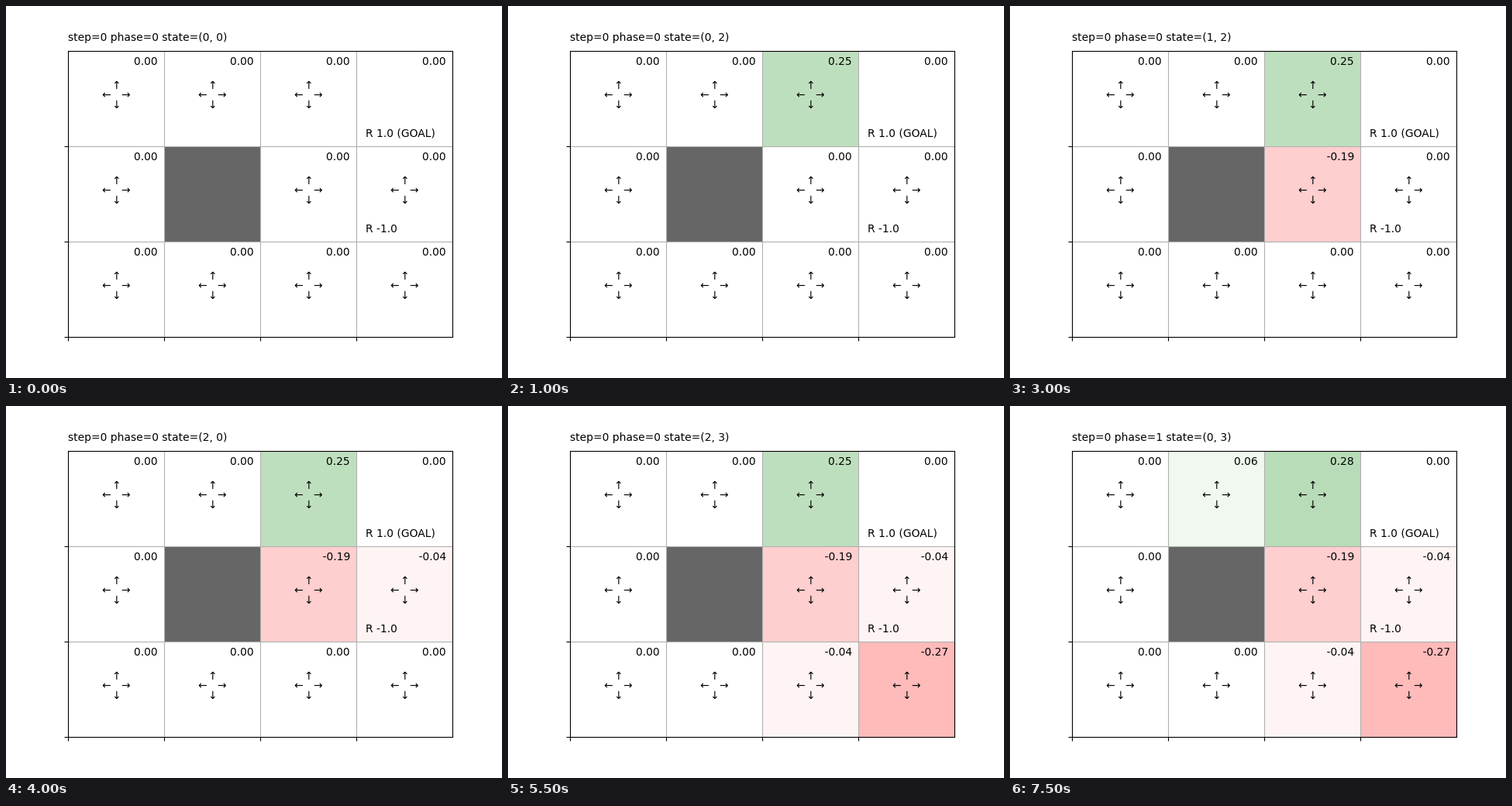
Animation of 640x480 px, one loop 8 s. Source, as a matplotlib script:

```python
import numpy as np
import matplotlib.pyplot as plt
from matplotlib.animation import FuncAnimation
from matplotlib.colors import LinearSegmentedColormap

ROWS, COLS = 3, 4
GOAL, WALL = (0, 3), (1, 1)
REWARDS = {GOAL: 1.0, (1, 3): -1.0}
MOVES = [(-1, 0), (1, 0), (0, -1), (0, 1)]
GAMMA = 0.9
FRAMES = 16


def step(state, move):
    y, x = state[0] + move[0], state[1] + move[1]
    if not (0 <= y < ROWS and 0 <= x < COLS) or (y, x) == WALL:
        return state
    return y, x


def evaluate(values, state):
    """In-place Bellman update of one state under the random policy."""
    if state == GOAL:
        return
    total = 0.0
    for move in MOVES:
        nxt = step(state, move)
        total += 0.25 * (REWARDS.get(nxt, 0.0) + GAMMA * values[nxt])
    values[state] = total


def sweep():
    values = np.zeros((ROWS, COLS))
    history = []
    for i in range(FRAMES):
        phase, cell = divmod(i, ROWS * COLS)
        state = divmod(cell, COLS)
        evaluate(values, state)
        history.append((phase, state, values.copy()))
    return history


history = sweep()

plt.rcParams["font.family"] = "DejaVu Sans"
fig = plt.figure(figsize=(6.4, 4.8), dpi=100)
ax = fig.add_subplot(111)
cmap = LinearSegmentedColormap.from_list("values", ["red", "white", "green"])
mesh = ax.pcolormesh(np.zeros((ROWS, COLS)), cmap=cmap, vmin=-1, vmax=1)
ax.tick_params(labelbottom=False, labelleft=False)
ax.set_xticks(range(COLS))
ax.set_yticks(range(ROWS))
ax.set_xlim(0, COLS)
ax.set_ylim(0, ROWS)
ax.grid(True)

title = ax.text(0, ROWS + 0.1, "")
labels = {}
for y, x in np.ndindex(ROWS, COLS):
    top = ROWS - y
    if (y, x) == WALL:
        ax.add_patch(plt.Rectangle((x, top - 1), 1, 1, fc=(0.4, 0.4, 0.4)))
        continue
    labels[y, x] = ax.text(x + 0.4, top - 0.15, "")
    if (y, x) in REWARDS:
        suffix = " (GOAL)" if (y, x) == GOAL else ""
        ax.text(x + 0.1, top - 0.9, f"R {REWARDS[y, x]}{suffix}")
    if (y, x) != GOAL:
        for (dy, dx), arrow in zip(MOVES, "↑↓←→"):
            ax.text(x + 0.45 + 0.1 * dx, top - 0.5 - 0.1 * dy, arrow)


def update(i):
    phase, (y, x), values = history[i]
    title.set_text(f"step=0 phase={phase} state=({y}, {x})")
    mesh.set_array(np.flipud(values))
    for state, label in labels.items():
        label.set_text(f"{values[state]:12.2f}")
    return [title, mesh, *labels.values()]


anim = FuncAnimation(fig, update, frames=FRAMES, interval=500,
                     repeat=True, repeat_delay=0, blit=False)
plt.show()
```
